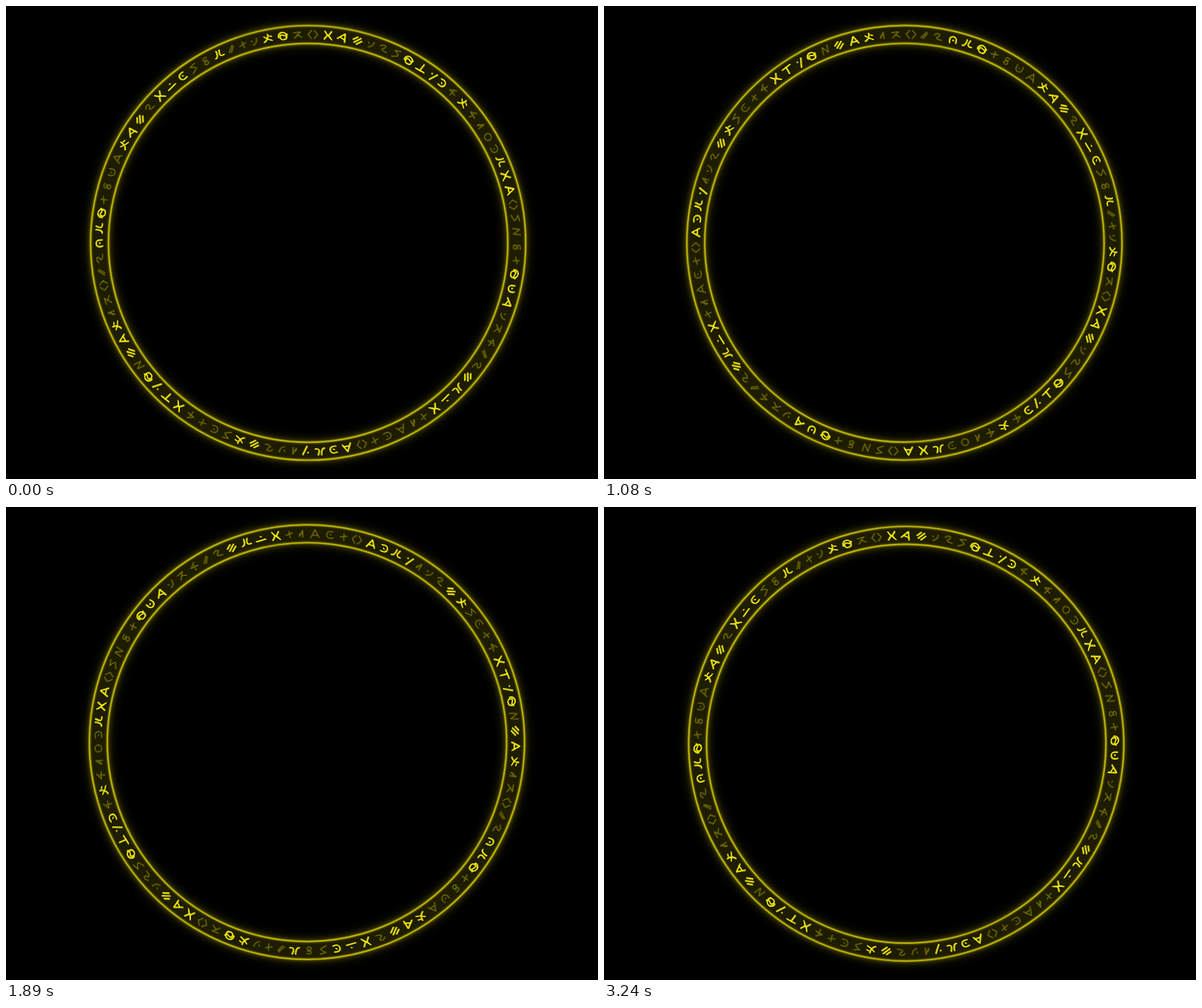
Recreate the animation shown at these times as an HTML page with a canvas. Size 800 px wide and 640 px high, loop 3330 ms.

```html
<!DOCTYPE html>
<html lang="en">
<head>
<meta charset="utf-8">
<title>Rune ring</title>
<style>
html, body { margin: 0; width: 100%; height: 100%; overflow: hidden; background: #000; }
canvas { display: block; }
</style>
</head>
<body>
<canvas id="stage" width="800" height="640"></canvas>
<script>
const ctx = document.getElementById('stage').getContext('2d');
const LOOP = 3330, STEP = 90, PAUSE = 22;
const INNER = 269.8, OUTER = 294, MID = 282, SPREAD = 20;
const RAD = Math.PI / 180;

// Rune strokes: y points to the ring's centre
const shapes = {
  a: 'M-3 4L2-5L2 5M-3 4Q-3-2 2 0',
  b: 'M-6-3L4-4L-5 5M-1 0L6 4',
  c: 'M4-5Q-5-6-5 0Q-4 7 5 4M0-1L1 0',
  d: 'M-2-6L-7 0L-2 6M2-6L7 0L2 6',
  e: 'M4-5Q-4-6-2-1Q5 0 3 4Q-1 7-3 3Q-1 0 3-2',
  f: 'M3-6L-5 0L6 1M1-2L0 6',
  g: 'M-6 5Q1 2 1-6M-5-3Q0 2 6 4M3-3L6-2',
  h: 'M-7 4Q-2 4-2-6M3-6Q-2 5 7 3',
  i: 'M-7 5L7 4M0 5L1-6',
  k: 'M-5 1L5-2M0-5L1 5',
  l: 'M-6 6L0-6L6 5M-3 2L5 2',
  m: 'M-7 3L7 2M0-3L1-3',
  o: 'M5 0A5 5 0 1 1 -5 0A5 5 0 1 1 5 0',
  q: 'M-6-2Q-2-7 2-4Q2-1-2 1Q-3 4 6 4',
  s: 'M5-6L-4-4Q5 0 3 2L-5 6',
  t: 'M-3 5Q4 3 4-4M-4-2L-3 0',
  v: 'M-5 6L-3-5L3 5L5-6',
  w: 'M-6 2A6 6 0 1 1 4 5Q-4 7-4 1Q-3-3 1-1Q4 2 7-2',
  x: 'M-5-6L-1 0L-5 6M5-6L1 0L6 6M-4-4L4 4',
  z: 'M-7 0L-1-5M-5 4L4-4M-1 6L6 0',
  '/': 'M-5 4L3-5M-2 5L4-3'
};
// Runes that are another rune turned: [base, degrees]
const turned = { j: ['i', 180], n: ['c', 90], p: ['m', -60], r: ['c', 180], u: ['c', -90], y: ['l', 25] };

const paths = {};
for (const key in shapes) paths[key] = new Path2D(shapes[key]);
for (const key in turned) {
  const [base, deg] = turned[key];
  paths[key] = new Path2D();
  paths[key].addPath(paths[base], new DOMMatrix().rotate(deg));
}

// Capitals are lit; slim runes take less room on the ring
const runes = [...'dXYZtqsWIPRfGfaorHXLdsvekWUYtbf/qZHMXkalckd' +
  'LRHPatqZGsckfXJPWvZLGabd/qNHWkeulGYZqXMCseH/ktGWb'];
const widthOf = char => 'atprks/'.includes(char.toLowerCase()) ? 0.8 : 1;
const unit = 360 / runes.reduce((sum, char) => sum + widthOf(char), 0);

// Turning speeds up, then settles: [step, degrees]
const turn = [[0, 0], [12, 103.6], [24, 243.8], [29, 293.6], [36, 360]];

function angleAt(time) {
  const tick = Math.floor((time % LOOP) / STEP);
  const step = tick > PAUSE ? tick - 1 : tick;
  const i = turn.findIndex(key => key[0] > step);
  const [s0, a0] = turn[i - 1], [s1, a1] = turn[i];
  return a0 + (a1 - a0) * (step - s0) / (s1 - s0);
}

function makeGlow() {
  const from = INNER - SPREAD, to = OUTER + SPREAD;
  const glow = ctx.createRadialGradient(0, 0, from, 0, 0, to);
  for (let r = from; r <= to; r++) {
    const d = Math.min(Math.abs(r - INNER), Math.abs(r - OUTER));
    const base = r > INNER && r < OUTER ? 0.13 : 0;
    const alpha = Math.max(base, 0.38 * Math.exp(-d / 5) * (1 - d / SPREAD));
    glow.addColorStop((r - from) / (to - from), `rgba(225,215,0,${alpha.toFixed(3)})`);
  }
  return glow;
}
const glow = makeGlow();

function circle(r, width, color) {
  ctx.beginPath();
  ctx.arc(0, 0, r, 0, 2 * Math.PI);
  ctx.lineWidth = width;
  ctx.strokeStyle = color;
  ctx.stroke();
}

function drawRune(char, angle) {
  const key = char.toLowerCase(), lit = char !== key;
  ctx.save();
  ctx.rotate(angle * RAD);
  ctx.translate(0, -MID);
  ctx.scale(0.92, 0.92);
  ctx.lineWidth = lit ? 1.5 : 1.3;
  ctx.strokeStyle = lit ? 'rgba(250,242,20,0.85)' : 'rgba(150,142,5,0.5)';
  // Two offset passes give a slanted pen nib
  for (const shift of [-0.5, 1]) {
    ctx.translate(shift, shift * 0.6);
    ctx.stroke(paths[key]);
  }
  ctx.restore();
}

function draw(time) {
  ctx.setTransform(1, 0, 0, 1, 0, 0);
  ctx.fillStyle = '#000';
  ctx.fillRect(0, 0, 800, 640);
  ctx.lineCap = ctx.lineJoin = 'round';
  // The ring sits slightly off its pivot
  ctx.translate(407.2, 319.5);
  ctx.rotate(angleAt(time) * RAD);
  ctx.translate(1.1, 1);
  circle(MID, OUTER - INNER + 2 * SPREAD, glow);
  for (const r of [INNER, OUTER]) {
    circle(r, 3.4, 'rgba(150,142,0,0.5)');
    circle(r, 1.7, 'rgba(205,195,12,0.85)');
  }
  let angle = 1.3 - unit / 2;
  for (const char of runes) {
    const width = widthOf(char) * unit;
    drawRune(char, angle + width / 2);
    angle += width;
  }
}

let start;
function tick(now) {
  if (start === undefined) start = now;
  draw(now - start);
  requestAnimationFrame(tick);
}
draw(0);
requestAnimationFrame(tick);
</script>
</body>
</html>
```
